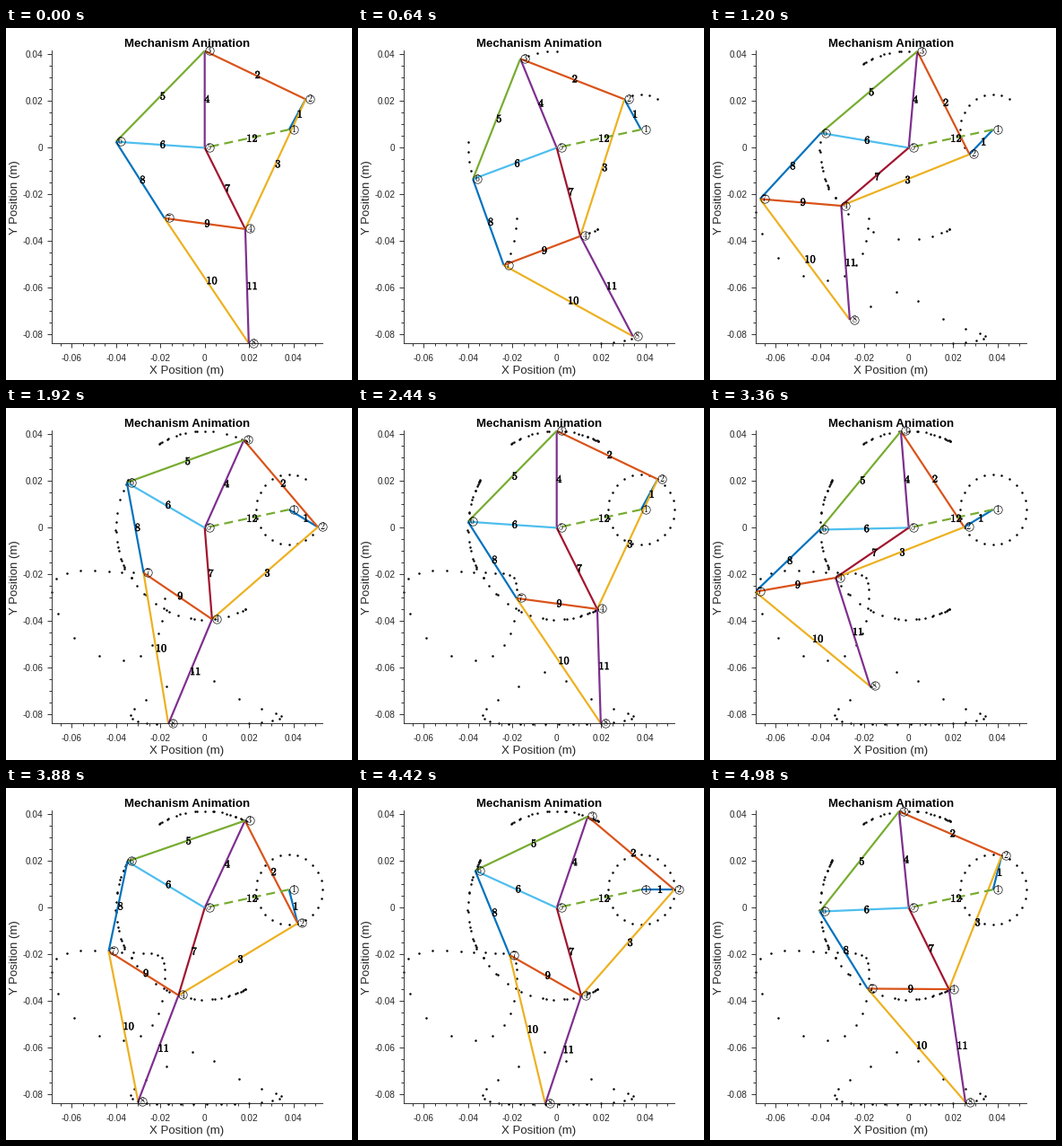
These frames come from a looping animation (386 by 392 pixels, 5 s). A matplotlib script:

```python
import numpy as np
import matplotlib.pyplot as plt
from matplotlib.animation import FuncAnimation
from matplotlib.patheffects import withStroke
from matplotlib.ticker import FuncFormatter, MultipleLocator
from matplotlib.transforms import offset_copy

W, H, DPI = 386, 392, 100
FRAMES, INTERVAL = 125, 40
PX = 72 / DPI  # points per pixel
GREY = "#262626"
BLUE, ORANGE, YELLOW, PURPLE = "#0072BD", "#D95319", "#EDB120", "#7E2F8E"
GREEN, CYAN, RED = "#77AC30", "#4DBEEE", "#A2142F"

plt.rcParams["font.family"] = "Liberation Sans"
plt.rcParams["mathtext.fontset"] = "cm"

# (node, node, colour) for bars 1 to 12
BARS = [
    (1, 2, BLUE), (2, 3, ORANGE), (2, 4, YELLOW), (3, 5, PURPLE),
    (3, 6, GREEN), (5, 6, CYAN), (4, 5, RED), (6, 7, BLUE),
    (4, 7, ORANGE), (7, 8, YELLOW), (4, 8, PURPLE), (1, 5, GREEN),
]
STEPS, TURN = 50, 24  # crank steps in all, and per revolution
# elapsed ms and crank step reached; the playback speed varies a little
CLOCK = [0, 560, 640, 1200, 1920, 2860, 3880, 4940]
COUNT = [0, 3, 4.5, 11.5, 18.5, 29.5, 39.5, 49]


def joint(p, q, rp, rq, side):
    """Meeting point of two bars hinged at p and q, as complex numbers."""
    d = abs(q - p)
    along = (rp**2 - rq**2 + d**2) / (2 * d)
    across = np.sqrt(rp**2 - along**2)
    return p + (q - p) / d * (along + 1j * side * across)


def solve():
    """Leg linkage in metres: node number -> position at every step."""
    angle = np.radians(60 + 360 / TURN * np.arange(STEPS))
    n = {5: np.zeros(STEPS, complex), 1: np.full(STEPS, 38 + 7.8j)}
    n[2] = n[1] + 15 * np.exp(1j * angle)
    n[3] = joint(n[2], n[5], 50, 41.5, -1)
    n[4] = joint(n[2], n[5], 61.9, 39.3, 1)
    n[6] = joint(n[3], n[5], 55.8, 40.1, -1)
    n[7] = joint(n[6], n[4], 39.4, 36.7, -1)
    n[8] = joint(n[7], n[4], 65.7, 49, -1)
    return {k: v / 1000 for k, v in n.items()}


nodes = solve()
fig = plt.figure(figsize=(W / DPI, H / DPI), dpi=DPI, facecolor="white")

# axes
left, right, top, bottom = 51, 353, 25.4, 351.4
ax = fig.add_axes([left / W, 1 - bottom / H, (right - left) / W, (bottom - top) / H])
x0, y0, sx, sy = 221.7, 133.4, 2475, 2600  # pixel origin, pixels per metre
ax.set_xlim((left - x0) / sx, (right - x0) / sx)
ax.set_ylim((y0 - bottom) / sy, (y0 - top) / sy)
ax.spines[["top", "right"]].set_visible(False)
for side in ("left", "bottom"):
    ax.spines[side].set(color=GREY, linewidth=0.9 * PX)
for axis, pad in ((ax.xaxis, 7), (ax.yaxis, 4.5)):
    axis.set_major_locator(MultipleLocator(0.02))
    axis.set_minor_locator(MultipleLocator(0.005))
    axis.set_major_formatter(FuncFormatter(lambda v, _: f"{round(v, 2) + 0:g}"))
    axis.set_tick_params(which="both", color=GREY, width=0.9 * PX)
    axis.set_tick_params(which="major", length=5 * PX, pad=pad * PX,
                         labelsize=10 * PX, labelcolor=GREY)
    axis.set_tick_params(which="minor", length=3 * PX)


def caption(x, y, text, **kw):
    fig.text(x / W, 1 - y / H, text, ha="center", va="center", **kw)


caption(201.8, 18, "Mechanism Animation", size=13.3 * PX, weight="bold", color="black")
caption(202, 382.3, "X Position (m)", size=13.2 * PX, color=GREY)
caption(10, 189, "Y Position (m)", size=13.2 * PX, color=GREY, rotation=90)


def shifted(dx, dy):
    return offset_copy(ax.transData, fig, dx / DPI, dy / DPI, units="inches")


# moving parts
dots, = ax.plot([], [], "o", ms=2.5 * PX, mfc="black", mew=0, clip_on=False, zorder=2)
rings, = ax.plot([], [], "o", ms=9.4 * PX, mfc="none", mec="black", mew=0.65 * PX,
                 clip_on=False, zorder=5, transform=shifted(5, 0.4))
bars, bar_names = [], []
heavy = [withStroke(linewidth=0.45 * PX, foreground="black")]
for i, (a, b, color) in enumerate(BARS, 1):
    line, = ax.plot([], [], color=color, lw=2.2 * PX, zorder=3,
                    solid_capstyle="butt")
    if i == 12:
        line.set_dashes([10 / 2.2, 6 / 2.2])
    bars.append(line)
    bar_names.append(ax.text(0, 0, rf"$\mathbf{{{i}}}$", size=12.2 * PX, zorder=6,
                             va="baseline", path_effects=heavy,
                             transform=shifted(-0.4, -3.6)))
node_names = {
    k: ax.text(0, 0, f"${k}$", size=10 * PX, ha="center", va="baseline",
               zorder=6, transform=shifted(5, -2.8))
    for k in sorted(nodes)
}


def draw(frame):
    step = int(np.interp(frame * INTERVAL, CLOCK, COUNT))
    now = {k: v[step] for k, v in nodes.items()}
    # later turns retrace the first one
    trail = np.concatenate([nodes[k][:min(step, TURN)] for k in (2, 3, 4, 6, 7, 8)])
    dots.set_data(trail.real, trail.imag)
    for (a, b, _), line, name in zip(BARS, bars, bar_names):
        p, q = now[a], now[b]
        line.set_data([p.real, q.real], [p.imag, q.imag])
        mid = (p + q) / 2
        name.set_position((mid.real, mid.imag))
    spots = np.array(list(now.values()))
    rings.set_data(spots.real, spots.imag)
    for k, name in node_names.items():
        name.set_position((now[k].real, now[k].imag))
    return [dots, rings, *bars, *bar_names, *node_names.values()]


anim = FuncAnimation(fig, draw, frames=FRAMES, interval=INTERVAL,
                     init_func=lambda: draw(0), repeat=True, repeat_delay=0)
plt.show()
```
